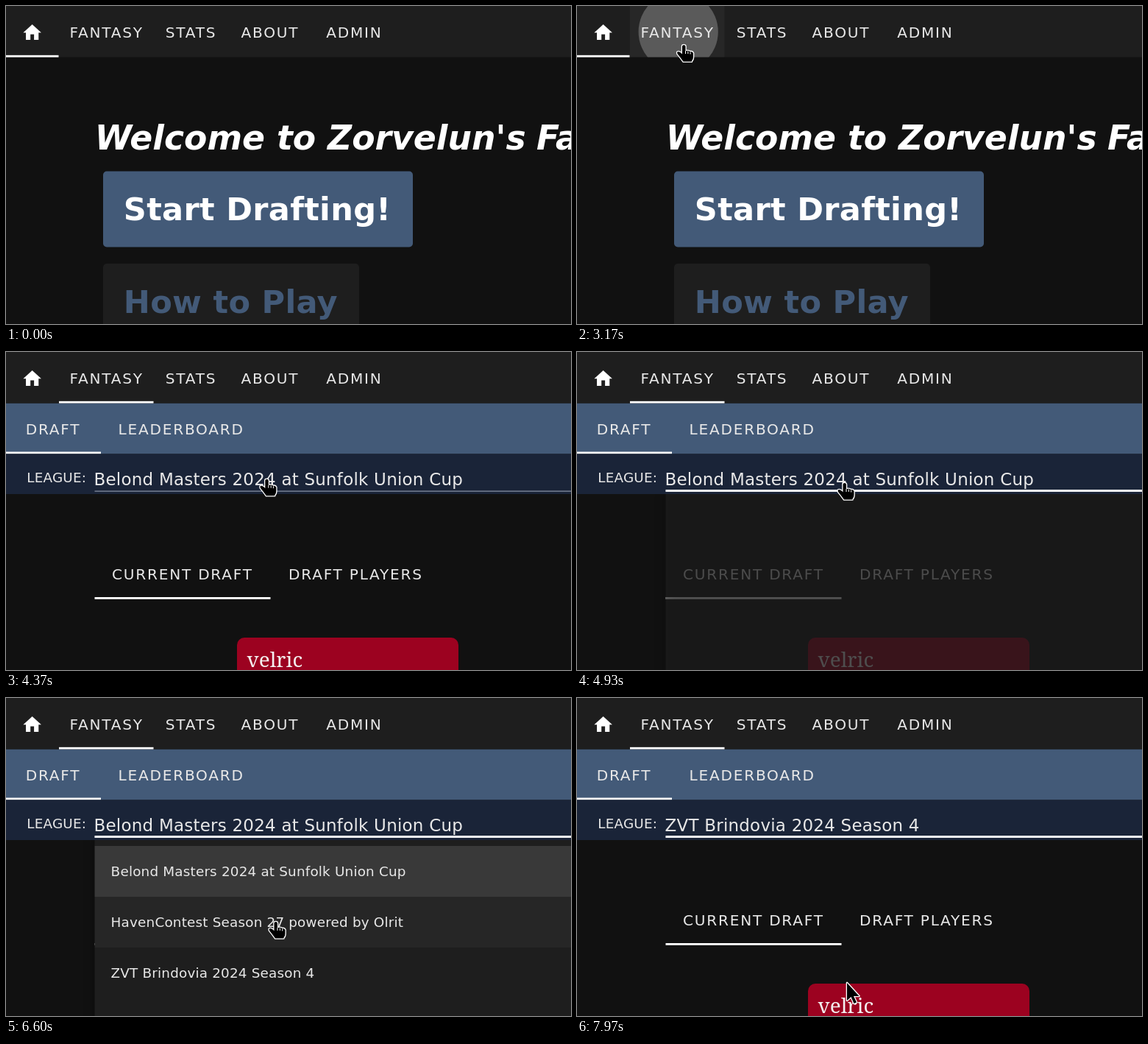
An HTML page with a canvas that plays this animation: 768 by 432 pixels, repeating every 8 s.

```html
<!DOCTYPE html>
<html lang="en">
<head>
<meta charset="utf-8">
<title>Fantasy draft walkthrough</title>
<style>
html, body { margin: 0; width: 100%; height: 100%; overflow: hidden; background: #111; }
canvas { display: block; }
</style>
</head>
<body>
<canvas id="stage" width="768" height="432"></canvas>
<script>
const ctx = document.getElementById('stage').getContext('2d');
const LOOP = 8000;
const SANS = '"DejaVu Sans", sans-serif', SERIF = '"Noto Serif", serif';
const BLUE = '#435a78', NAV = '#1e1e1e', PAGE = '#111', LIGHT = '#e8e8e8';

const LEAGUES = [
  'Belond Masters 2024 at Sunfolk Union Cup',
  'HavenContest Season 27 powered by Olrit',
  'ZVT Brindovia 2024 Season 4'
];

const HOME = new Path2D('M10 20V14H14V20H19V12H22L12 3 2 12H5V20Z');
const ARROW = new Path2D('M0 0V24L5.5 19 9.5 28 13 26.5 9 18H16.5Z');
const HAND = new Path2D('M-2.5 2q0-2 2.2-2t2.3 2v6q5-1 6 1 3.5-.5 4.5 2v5q0 4-2 5.5v1H-1q-3.5-5-8-10.5-1-3 1-3 3 0 5.5 3.5z');
const FINGERS = new Path2D('M2 8v4M5.4 8.5v3.5M8.6 9.5v3');

// Pointer path: time, x, y
const TRACK = [
  [1630, 114, 440], [1670, 113, 428], [2050, 102, 250], [2430, 141, 63],
  [2530, 141, 63], [2600, 145.5, 53], [3670, 145.5, 53], [4470, 364, 178],
  [5330, 364, 178], [5970, 367, 304], [6600, 367, 304], [7070, 367, 387]
];

const progress = (t, a, b) => Math.min(1, Math.max(0, (t - a) / (b - a)));
const smooth = p => p * p * (3 - 2 * p);
const mix = (a, b, p) => a + (b - a) * p;

function pointerAt(t) {
  const i = TRACK.findIndex(k => k[0] > t);
  if (i === 0) return TRACK[0].slice(1);
  if (i < 0) return TRACK[TRACK.length - 1].slice(1);
  const [ta, xa, ya] = TRACK[i - 1], [tb, xb, yb] = TRACK[i];
  const p = smooth(progress(t, ta, tb));
  return [mix(xa, xb, p), mix(ya, yb, p)];
}

function rect(x, y, w, h, color) {
  ctx.fillStyle = color;
  ctx.fillRect(x, y, w, h);
}

function rounded(x, y, w, h, r, color) {
  ctx.fillStyle = color;
  ctx.beginPath();
  ctx.roundRect(x, y, w, h, r);
  ctx.fill();
}

function text(str, x, y, size, { color = LIGHT, style = '', family = SANS, spacing = 0 } = {}) {
  ctx.font = `${style} ${size}px ${family}`;
  ctx.letterSpacing = spacing + 'px';
  ctx.fillStyle = color;
  ctx.fillText(str, x, y);
}

const tab = (str, x, y) => text(str, x, y, 20.12, { spacing: 1.75 });
const field = (str, x, y, size) => text(str, x, y, size, { spacing: size * 0.009375 });

function faded(alpha, draw) {
  if (alpha <= 0) return;
  ctx.save();
  ctx.globalAlpha *= alpha;
  draw();
  ctx.restore();
}

function nav(t) {
  rect(0, 0, 768, 69.5, NAV);
  const hover = progress(t, 2600, 2700) * (1 - progress(t, 3800, 3950));
  rect(72, 0, 128.5, 69.5, `rgba(255,255,255,${0.04 * hover})`);

  const ripple = progress(t, 3105, 3405);
  if (ripple > 0 && t < 3500) {
    ctx.save();
    ctx.beginPath();
    ctx.rect(72, 0, 128.5, 69.5);
    ctx.clip();
    ctx.fillStyle = `rgba(255,255,255,${0.235 * (1 - progress(t, 3250, 3500))})`;
    ctx.beginPath();
    ctx.arc(137.7, 35, mix(22, 73, 1 - (1 - ripple) ** 4), 0, 7);
    ctx.fill();
    ctx.restore();
  }

  ctx.save();
  ctx.translate(20.9, 21.4);
  ctx.scale(1.23, 1.23);
  ctx.fillStyle = '#fff';
  ctx.fill(HOME);
  ctx.restore();

  tab('FANTASY', 86.6, 42.8);
  tab('STATS', 216.7, 42.8);
  tab('ABOUT', 319.5, 42.8);
  tab('ADMIN', 435.2, 42.8);

  const slide = smooth(progress(t, 3220, 3450));
  rect(mix(0, 72, slide), 66.8, mix(71.5, 128.5, slide), 2.8, '#fff');
}

function welcome() {
  const title = { color: '#fff', style: 'italic bold' };
  text("Welcome to Zorvelun's", 120.8, 195, 45.7, title);
  text('Fa', 721, 195, 45.7, title);
  rounded(132, 224.5, 421, 103, 5, BLUE);
  text('Start Drafting!', 159.8, 290.5, 43.1, { color: '#fff', style: 'bold', spacing: 0.3 });
  rounded(132, 350, 348, 103, 5, NAV);
  text('How to Play', 159.8, 416.8, 43.1, { color: BLUE, style: 'bold', spacing: 0.3 });
}

function menu(t, y) {
  const shown = progress(t, 4830, 4980) * (1 - progress(t, 7740, 7890));
  faded(shown, () => {
    ctx.shadowColor = 'rgba(0,0,0,.4)';
    ctx.shadowBlur = 14;
    rect(120.5, 190, 700, 300, NAV);
    ctx.shadowBlur = 0;
    faded(progress(t, 4980, 5160), () => {
      rect(120.5, 201, 648, 69, 'rgba(255,255,255,.12)');
      const hovered = Math.floor((y - 201) / 69);
      if (hovered >= 0) rect(120.5, 201 + hovered * 69, 648, 69, 'rgba(255,255,255,.035)');
      LEAGUES.forEach((name, i) => field(name, 142.6, 242.3 + i * 68.8, 18.4));
    });
  });
}

function draft(t, y) {
  tab('CURRENT DRAFT', 144, 309);
  tab('DRAFT PLAYERS', 384, 309);
  rect(120.5, 333, 239, 2.8, '#fff');
  rounded(314, 388, 301, 80, 10, '#9c0220');
  text('velric', 327.5, 428, 28, { color: '#f4f0f0', family: SERIF });

  menu(t, y);

  rect(0, 69.5, 768, 69, BLUE);
  tab('DRAFT', 26.7, 111.5);
  tab('LEADERBOARD', 152.6, 111.5);
  rect(0, 135.5, 129, 2.8, '#fff');

  rect(0, 138.5, 768, 54.5, '#1a2438');
  text('LEAGUE:', 28.3, 177.3, 18.4, { spacing: 0.17 });
  field(LEAGUES[t < 7720 ? 0 : 2], 119.5, 181.4, 23);
  rect(120.5, 188.4, 648, 1.4, '#7c8598');
  const focus = smooth(progress(t, 4500, 4720));
  const half = 560 * focus;
  const left = Math.max(120.5, 680 - half);
  if (focus > 0) rect(left, 187, Math.min(768, 680 + half) - left, 2.9, '#fff');
}

function pointer(t, x, y) {
  const pointing = t >= 2565 && t < 7900;
  const shape = pointing ? HAND : ARROW;
  ctx.save();
  ctx.translate(x, y);
  ctx.lineJoin = 'round';
  ctx.lineWidth = 2.6;
  ctx.strokeStyle = '#fff';
  ctx.stroke(shape);
  ctx.fillStyle = '#000';
  ctx.fill(shape);
  if (pointing) {
    ctx.lineWidth = 1;
    ctx.stroke(FINGERS);
  }
  ctx.restore();
}

function frame() {
  const t = performance.now() % LOOP;
  const [x, y] = pointerAt(t);
  rect(0, 0, 768, 432, PAGE);
  if (t < 3270) welcome();
  else draft(t, y);
  nav(t);
  pointer(t, x, y);
  requestAnimationFrame(frame);
}
frame();
</script>
</body>
</html>
```
